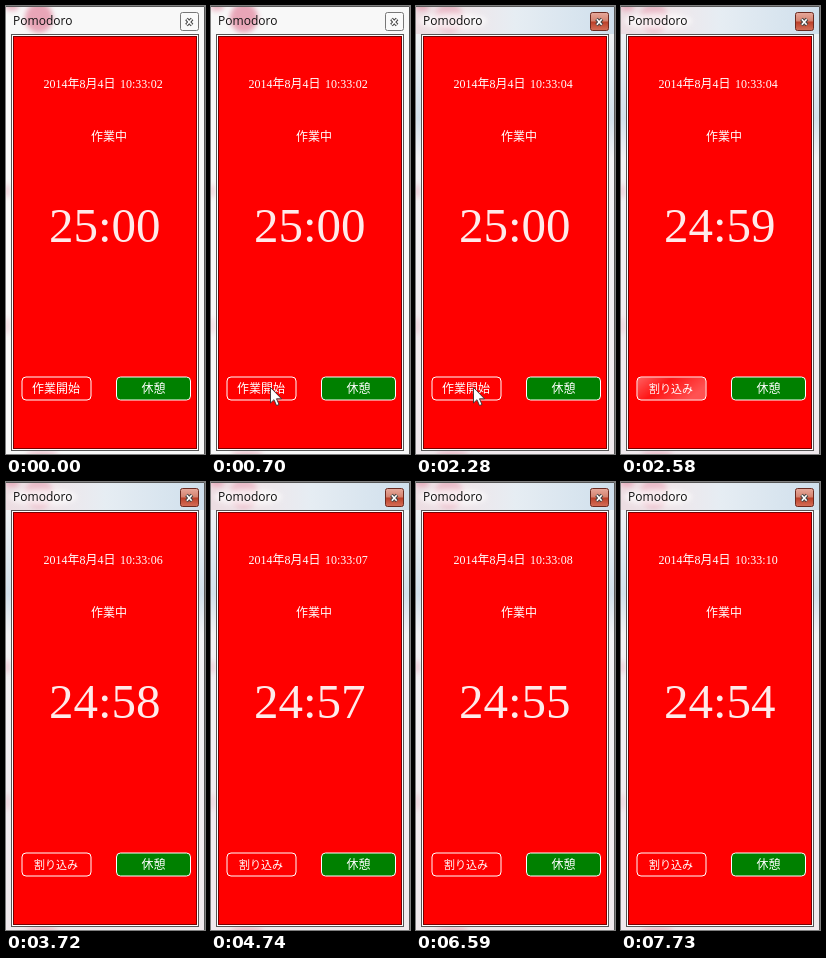
Write an HTML page that moves like this. It is 199 by 448 pixels and loops after 8 s.

```html
<!DOCTYPE html>
<html lang="ja">
<head>
<meta charset="utf-8">
<title>Pomodoro</title>
<style>
  html, body { margin: 0; width: 100%; height: 100%; overflow: hidden; background: #f8f8f8; }
  svg { display: block; width: 199px; height: 448px; }
  text { fill: #fff; font: 12px "Noto Sans CJK JP", "Noto Sans CJK", sans-serif; }
  .title { fill: #111; font: 12px "Open Sans", sans-serif; }
  .date { font-family: "Liberation Serif", "Noto Sans CJK JP", serif; }
  .timer { fill: #ffeaea; font: 49px "Liberation Serif", serif; }
  .button { font-weight: 500; text-anchor: middle; }
</style>
</head>
<body>
<svg viewBox="0 0 199 448">
  <defs>
    <linearGradient id="glass">
      <stop offset="0" stop-color="#ecdde2"/>
      <stop offset=".25" stop-color="#efe6ea"/>
      <stop offset=".5" stop-color="#e6edf3"/>
      <stop offset="1" stop-color="#cfdfec"/>
    </linearGradient>
    <linearGradient id="edge" x2="0" y2="1">
      <stop offset="0" stop-color="#d3e1ec" stop-opacity="0"/>
      <stop offset=".25" stop-color="#d3e1ec"/>
      <stop offset=".34" stop-color="#f2f2f5"/>
      <stop offset="1" stop-color="#f0e9ed"/>
    </linearGradient>
    <linearGradient id="close" x2="0" y2="1">
      <stop offset="0" stop-color="#e7aa9c"/>
      <stop offset=".48" stop-color="#d4826f"/>
      <stop offset=".52" stop-color="#bb3f28"/>
      <stop offset="1" stop-color="#d5705a"/>
    </linearGradient>
    <linearGradient id="shine" y2=".4">
      <stop offset="0" stop-color="#fff" stop-opacity=".38"/>
      <stop offset=".45" stop-color="#fff" stop-opacity=".08"/>
      <stop offset="1" stop-color="#fff" stop-opacity=".32"/>
    </linearGradient>
    <filter id="blur" x="-50%" y="-50%" width="200%" height="200%">
      <feGaussianBlur stdDeviation="2.5"/>
    </filter>
  </defs>

  <rect width="199" height="448" fill="#f8f8f8"/>
  <g id="active">
    <rect width="199" height="448" fill="url(#edge)"/>
    <rect width="199" height="28" fill="url(#glass)"/>
  </g>
  <g filter="url(#blur)" fill="#e79cb0">
    <ellipse id="blob" cx="33" cy="12" rx="14" ry="15"/>
    <ellipse cx="6" cy="1" rx="7" ry="4" opacity=".7"/>
    <ellipse cx="1" cy="185" rx="3" ry="7" opacity=".4"/>
    <ellipse cx="1" cy="320" rx="3" ry="9" opacity=".3"/>
    <ellipse cx="36" cy="448" rx="16" ry="3" opacity=".6"/>
  </g>
  <ellipse id="halo" cx="37" cy="15" rx="34" ry="8" fill="#fff" opacity=".7" filter="url(#blur)"/>
  <path d="M0 .5H198.5V448" fill="none" stroke="#555"/>
  <text class="title" x="7" y="19">Pomodoro</text>

  <rect id="closeBox" x="174.5" y="6.5" width="18" height="18" rx="2"/>
  <path d="M180.5 13L186 19M186 13L180.5 19" stroke="#444" stroke-width="3.6"/>
  <path d="M180.8 13.3L185.7 18.7M185.7 13.3L180.8 18.7" stroke="#fff" stroke-width="1.6"/>

  <rect x="5.5" y="28.5" width="187" height="416" fill="#fff" stroke="#555"/>
  <rect x="7.5" y="30.5" width="183" height="412" fill="#f00" stroke="#700"/>

  <text class="date" x="37.5" y="82" textLength="0">2014年8月4日</text>
  <text class="date" id="clock" x="114" y="82"></text>
  <text x="85" y="135">作業中</text>
  <text class="timer" id="timer" x="43" y="236"></text>

  <g stroke="#fff">
    <rect x="16" y="371" width="69" height="23" rx="4" fill="#f00"/>
    <rect x="110.500" y="371" width="74" height="23" rx="4" fill="#008000"/>
  </g>
  <rect id="glow" x="16.500" y="371.500" width="68" height="22" rx="4" fill="url(#shine)"/>
  <text class="button" id="label" x="50" y="387"></text>
  <text class="button" x="147.500" y="387">休憩</text>

  <path id="cursor" d="M.5 .5V16L4 12.700L6.500 18.500L9 17.500L6.500 11.800H11.500Z" fill="#fff" stroke="#333" stroke-width=".9"/>
</svg>
<script>
const LOOP = 8000, ACTIVATE = 2280, START = 2580;
const clockTicks = [820, 2000, 2850, 3720, 4740, 5940, 6860, 7730];
const timerTicks = [START, 3440, 4430, 5670, 6590, 7450];
// [time, x, y]
const cursorSteps = [
  [150, 60, 419], [270, 60, 395], [390, 60, 381],
  [700, 59, 381], [820, 58, 381], [970, 57, 381], [2430, 57, 382]
];
// [time, opacity]
const glowSteps = [[0, 0], [2430, 1], [2700, .5], [2850, 0]];

const el = id => document.getElementById(id);
const passed = (ticks, t) => ticks.filter(tick => tick <= t).length;
const latest = (steps, t) => steps.filter(step => step[0] <= t).pop();
const pad = n => String(n).padStart(2, "0");
const show = (id, on) => el(id).setAttribute("visibility", on ? "visible" : "hidden");

function draw(t) {
  const active = t >= ACTIVATE, working = t >= START;
  const left = 25 * 60 - passed(timerTicks, t);

  el("clock").textContent = "10:33:" + pad(2 + passed(clockTicks, t));
  el("timer").textContent = pad(Math.floor(left / 60)) + ":" + pad(left % 60);
  el("label").textContent = working ? "割り込み" : "作業開始";
  el("label").style.fontSize = working ? "11px" : "12px";
  el("label").style.fontWeight = working ? 400 : 500;

  show("active", active);
  show("halo", active);
  el("blob").setAttribute("opacity", active ? .55 : .9);
  el("closeBox").setAttribute("fill", active ? "url(#close)" : "#fafafa");
  el("closeBox").setAttribute("stroke", active ? "#6b2a20" : "#777");
  el("glow").setAttribute("opacity", latest(glowSteps, t)[1]);

  const step = latest(cursorSteps, t);
  show("cursor", step && !working);
  if (step) el("cursor").setAttribute("transform", `translate(${step[1]} ${step[2]})`);
}

const begin = performance.now();
function frame() {
  draw((performance.now() - begin) % LOOP);
  requestAnimationFrame(frame);
}
frame();
</script>
</body>
</html>
```
